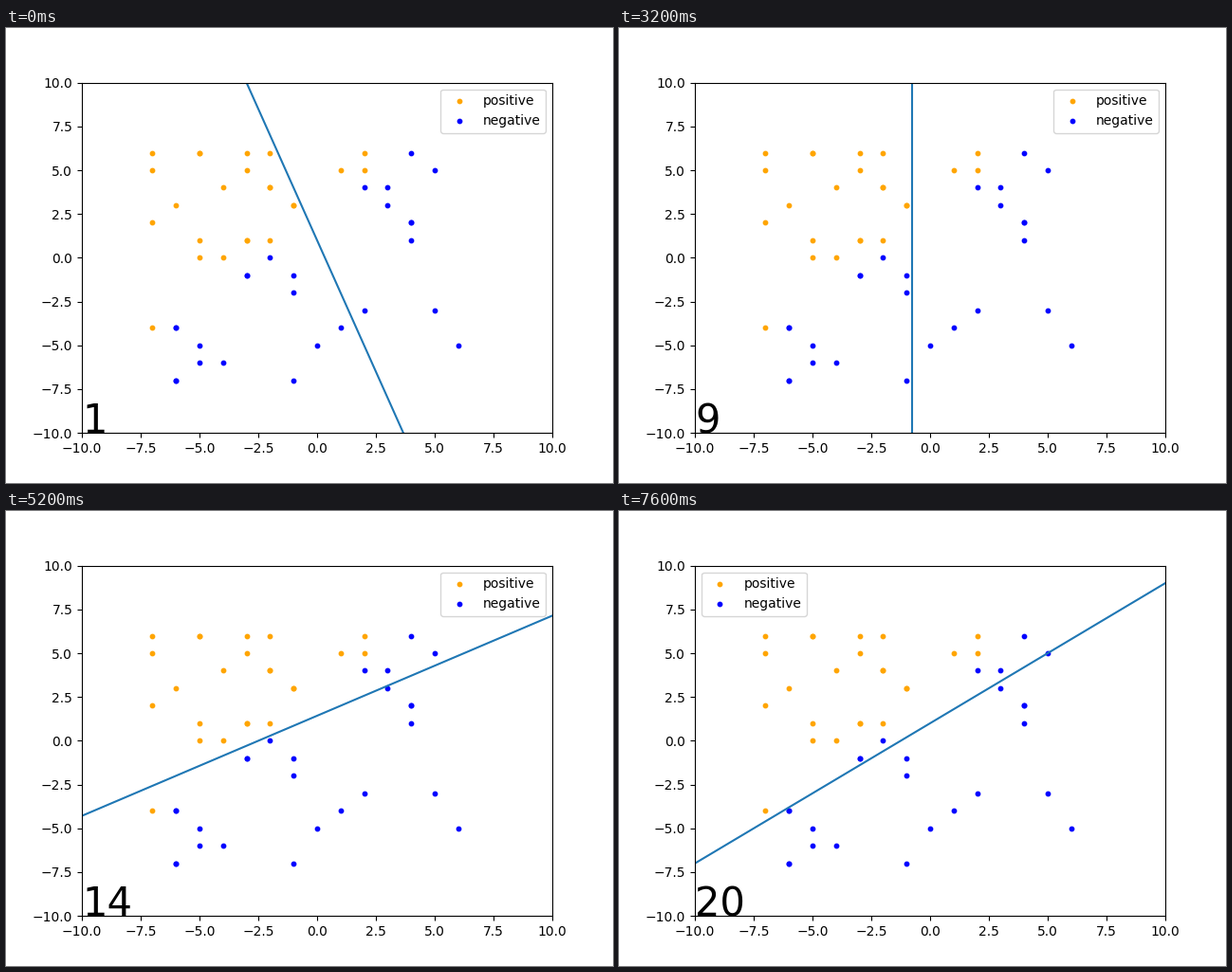
Write a matplotlib script that moves like this. It is 640x480 px and loops after 8 s.

```python
from itertools import cycle

import numpy as np
import matplotlib.pyplot as plt
from matplotlib.animation import FuncAnimation

STEPS = 20

# Points near the class border, in training order; only these ever move the line.
HARD = {
    -1: [(-3, -1), (-2, 0), (6, -5), (5, 5), (-4, -6), (4, 6), (-5, -6),
         (2, 4), (-3, -1)],
    1: [(2, 6), (-7, -4), (1, 5), (2, 5)],
}


def columns(first_x, heights):
    """Points stacked over consecutive integer x values."""
    return [(x, y) for x, ys in enumerate(heights, first_x) for y in ys]


EASY = {
    -1: columns(-6, [[-4, -4, -7, -7], [-5]])
    + columns(-1, [[-1, -2, -7], [-5], [-4], [-3], [3, 4], [1, 2, 2], [-3]]),
    1: columns(-7, [[2, 5, 6], [3], [0, 1, 6, 6], [0, 4], [1, 1, 5, 6],
                    [1, 4, 4, 6], [3, 3]]),
}


def train(steps):
    """Cycle through the samples; return (wx, wy, bias) after each update."""
    samples = [(label, np.array([x, y, 1]))
               for label, points in HARD.items() for x, y in points]
    weights = np.zeros(3)
    history = []
    for label, sample in cycle(samples):
        if label * (weights @ sample) <= 0:
            weights = weights + label * sample
            history.append(weights)
        if len(history) == steps:
            return history


def boundary(weights, reach=40):
    """Two far points on the line wx*x + wy*y + bias = 0."""
    normal, bias = weights[:2], weights[2]
    foot = -bias * normal / (normal @ normal)
    along = np.array([-normal[1], normal[0]]) / np.hypot(*normal)
    return np.array([foot - reach * along, foot + reach * along]).T


fig, ax = plt.subplots(figsize=(6.4, 4.8), dpi=100)
ax.set(xlim=(-10, 10), ylim=(-10, 10))
for label, color, name in [(1, "orange", "positive"), (-1, "blue", "negative")]:
    ax.scatter(*zip(*HARD[label], *EASY[label]), s=10, c=color, label=name)
line, = ax.plot([], [])
counter = ax.text(-10, -10, "", fontsize=30)
ax.legend(loc="best")

history = train(STEPS)


def update(step):
    line.set_data(*boundary(history[step]))
    counter.set_text(str(step + 1))
    return line, counter


anim = FuncAnimation(fig, update, frames=STEPS, interval=400,
                     repeat=True, repeat_delay=0)
plt.show()
```
